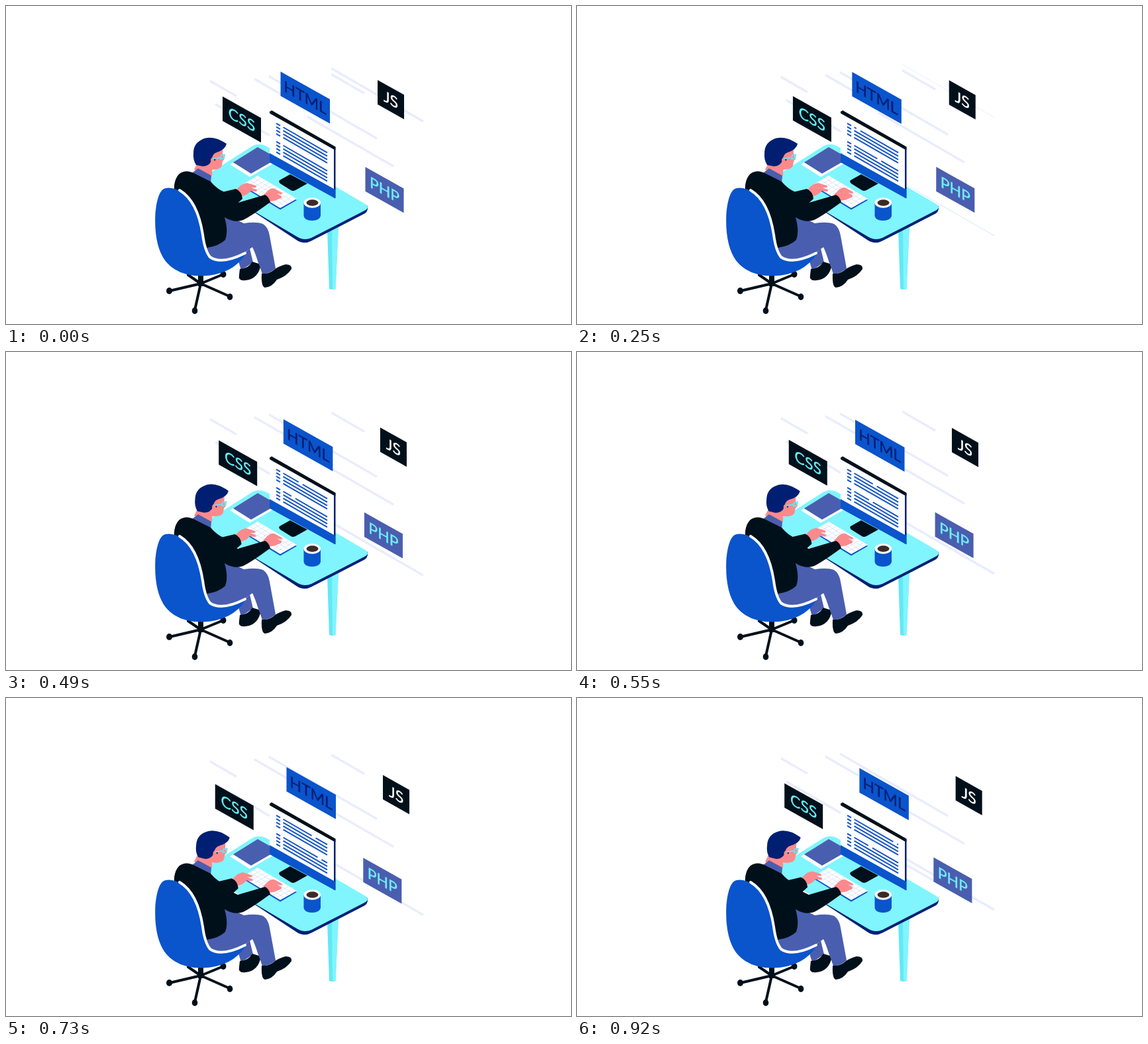
An HTML page that plays this animation: 853x480 px, repeating every 0.98 s.

```html
<!DOCTYPE html>
<html lang="en">
<head>
<meta charset="utf-8">
<title>Developer at a desk</title>
<style>
html, body { margin: 0; width: 100%; height: 100%; overflow: hidden; background: #fff; }
svg { display: block; width: 100vw; height: 100vh; }
text { font: 23px Lato, "Open Sans", sans-serif; text-anchor: middle; stroke-width: .4px; }
.blue { fill: #0a54cc; }
.navy { fill: #001f73; }
.dark { fill: #00101a; }
.slate { fill: #4a5eaf; }
.skin { fill: #fb8a8d; }
.cyan { fill: #80f5fe; }
.white { fill: #fff; }
.line { fill: none; stroke-linecap: round; stroke-linejoin: round; }
</style>
</head>
<body>
<svg viewBox="0 0 853 480">
  <g id="streaks" stroke="#e8ecfd"></g>
  <g id="cards"></g>

  <!-- desk -->
  <path fill="#62e8f5" d="M485 338L502 330L497.500 427Q493 429 488 427Z"/>
  <path class="cyan" d="M492 335L502 330L497.500 427Q495 428 493 428Z"/>
  <path class="navy" d="M300 262L439 353.500Q450 360.500 461 354.500L541 313.500Q547 310 546 302L400 230Z"/>
  <path class="cyan" d="M300 257L371 212Q380 206 392 211L541 298Q551 304 541 309L461 350Q450 355 439 348L300 266Z"/>

  <!-- notebook -->
  <path class="white" d="M338 239L343 236L370 252L410 229V234L368 258Z"/>
  <path class="slate" d="M343 236L380 213L410 230L370 253Z"/>

  <!-- monitor -->
  <path class="dark" d="M413 263L429 254L455 268L437 278Q433 280 430 278L414 268Q411 265 413 263Z"/>
  <path class="dark" d="M398 163V159.500L401 157.500L497.500 212.500V217L494 219Z"/>
  <path class="navy" d="M494 217L497.500 213V290L494 289Z"/>
  <path class="white" d="M398 162L495 216.500V280L398 226Z"/>
  <path class="blue" d="M398 222L495 276L497 277V290.500L398 236Z"/>
  <g id="code" class="line" stroke-width="2"></g>

  <!-- keyboard -->
  <path class="blue" d="M356 272L380 258L439 293L414 307.500Z"/>
  <path class="white" d="M356 270L380 256L439 291L414 305Z"/>
  <g id="keys" stroke="#d2dff5" stroke-width=".8"></g>

  <!-- mug -->
  <path class="blue" d="M449.500 297V317Q451 324 462 324T475 317V297Z"/>
  <ellipse class="white" cx="462.300" cy="297" rx="12.800" ry="7.800"/>
  <ellipse fill="#3b2b28" cx="462.500" cy="297" rx="9" ry="4.700"/>

  <!-- legs -->
  <path class="slate" d="M350 382L368 366L373 387L355 399Z"/>
  <path class="dark" d="M353 397Q365 397 372 386L385 390Q381 412 362 414Q350 416 352 406Z"/>
  <path class="slate" d="M328 319Q342 319 359 328Q378 325 388 329Q396 334 398 347L407 396Q398 404 387 405Q385 398 380 385Q376 372 372 364L340 386L303 380V358Z"/>
  <path class="dark" d="M386 404Q398 405 406 397Q412 393 422 390Q432 390 431 397Q424 408 409 413Q402 424 391 425Q385 424 386 404Z"/>

  <!-- hands -->
  <g id="farHand">
    <path class="skin" d="M346 281L350 275Q356 268 364 267L377 271Q380 273 376 274L370 274L378 277Q381 280 376 280L369 279Q366 284 360 286L352 288Z"/>
    <path class="dark" d="M326 281L347 276Q356 280 357 291L345 302L328 296Z"/>
  </g>
  <g id="nearHand">
    <path class="skin" d="M388 286L396 278Q401 274 406 276L417 282Q418 284 414 284L409 283L416 287Q417 290 412 291Q406 295 397 295Z"/>
  </g>

  <!-- head and torso -->
  <path class="skin" d="M289 237L312 236L311 256Q302 258 284 247Z"/>
  <path class="slate" d="M281 252L290 245L310 256L309 268Q296 264 281 252Z"/>
  <g id="head">
    <path class="skin" d="M296 221L327 215L327 224L330 231L327 234L326 241Q324 247 312 247L301 247L292 239Z"/>
    <path class="navy" d="M283 222Q283 208 295 202Q305 196 320 201Q329 205 333 208Q331 217 318 221Q311 223 310 234Q306 242 297 242L287 240Q282 232 283 222Z"/>
    <ellipse class="skin" cx="312" cy="233" rx="3" ry="4"/>
    <path class="dark" d="M313.500 231.500L316.500 231L315.500 234Z"/>
    <path class="line" stroke="#65e5f2" stroke-width="1.900" d="M313 230.500L324 228.500M325 225.500L330 224.500L329 230L324 231Z"/>
  </g>
  <path class="dark" d="M254 284Q252 262 262 253Q272 246 285 253L309 265Q318 276 330 281L340 292L350 297L391 285Q397 288 399 296Q372 316 358 323Q345 328 330 319Q336 340 331 353Q322 362 303 365L275 330Z"/>

  <!-- chair -->
  <g class="line" stroke="#00101a">
    <path stroke-width="8" stroke-linecap="butt" d="M294 402V423"/>
    <path stroke-width="4" d="M294 419L247 430M294 419L285 459M294 419L337 438M294 419L328 405M294 419L275 406"/>
  </g>
  <g class="dark">
    <ellipse cx="246.500" cy="430" rx="4.500" ry="5"/>
    <ellipse cx="285" cy="460" rx="4.300" ry="5"/>
    <ellipse cx="338" cy="439" rx="4.300" ry="5"/>
    <ellipse cx="328" cy="405" rx="4.500" ry="5"/>
  </g>
  <path class="blue" d="M241 275Q229 277 225.500 312Q223 360 240 384Q258 407.500 296 407.500Q342 406 362 374Q325 392 306 379Q299 368 296 345Q288 295 262 279Q250 273 241 275Z"/>
  <path class="line" stroke="#fff" stroke-width="4" d="M262 278Q289 294 297 345Q300 369 308 379Q325 391 361 373"/>
</svg>

<script>
const LOOP = 980, ISO = 0.577;
const $ = id => document.getElementById(id);

function add(parent, tag, attrs) {
  const el = document.createElementNS("http://www.w3.org/2000/svg", tag);
  for (const k in attrs) el.setAttribute(k, attrs[k]);
  return parent.appendChild(el);
}

const clamp = v => Math.max(0, Math.min(1, v));
const ramp = (t, a, b) => clamp((t - a) / (b - a));
const smooth = (t, a, b) => { const p = ramp(t, a, b); return p * p * (3 - 2 * p); };

// A stroke along the isometric axis, from x1 to x2
const iso = (x1, y1, x2) => `M${x1} ${y1}L${x2} ${y1 + (x2 - x1) * ISO}`;

// Rising streaks: start x, start y, end x, speed in px/ms, visibility over time
const SLOW = 0.0238, FAST = 0.0405;
const always = () => 1;
const streaks = [
  [308, 113, 348, SLOW, always],
  [375, 110, 425, SLOW, always],
  [397, 106, 560, SLOW, always],
  [316, 148, 402, SLOW, always],
  [455, 167, 585, SLOW, always],
  [491, 94, 630, SLOW, t => 1 - ramp(t, 130, 290)],
  [491, 103, 541, SLOW, t => 1 - ramp(t, 730, 880)],
  [491, 276.800, 630, FAST, t => ramp(t, 190, 350)],
  [491, 285.500, 541, FAST, t => ramp(t, 780, 920)]
].map(([x1, y, x2, speed, show]) =>
  ({ speed, show, el: add($("streaks"), "path", { d: iso(x1, y, x2) }) }));

// Floating cards: label, x, y, width, colours, travel, end of easing
const cards = [
  ["CSS", 327, 136.600, 58, "#00101a", "#65f0f8", -14, 980],
  ["HTML", 414.500, 99, 74.500, "#0a54cc", "#001f73", 13, 1100],
  ["JS", 561, 111.700, 40, "#00101a", "#fff", 11.600, 1100],
  ["PHP", 542.500, 243, 58, "#4a5eaf", "#70eefa", -4.600, 1100]
].map(([label, x, y, w, bg, ink, travel, end]) => {
  const el = add($("cards"), "g", {});
  add(el, "rect", { width: w, height: 36.800, fill: bg });
  add(el, "text", { x: w / 2, y: 26.700, fill: ink, stroke: ink }).textContent = label;
  return { el, x, y, travel, end };
});

// Code rows on the screen, in two blocks of four
const rowY = i => 183 + (i % 4) * 5.200 + (i > 3 ? 27.500 : 0);
for (let i = 0; i < 8; i++) {
  add($("code"), "path", {
    stroke: "#1354c4",
    "stroke-linecap": "butt",
    d: iso(408, rowY(i) - 5.800, 414) + iso(418.500, rowY(i), 485)
  });
}
const gaps = [0, 4].map(row => ({
  row,
  el: add($("code"), "path", { stroke: "#fff", "stroke-width": 3.600, "stroke-linecap": "butt" })
}));

// Keyboard grid
for (let i = 1; i < 4; i++)
  add($("keys"), "path", { d: `M${380 - 6 * i} ${256 + 3.500 * i}l58.500 35` });
for (let i = 1; i < 10; i++)
  add($("keys"), "path", { d: `M${380 + 5.900 * i} ${256 + 3.500 * i}l-24.500 14` });

function setGap({ row, el }, x) {
  const a = Math.max(418, x - 3), b = Math.min(486, x + 3);
  el.setAttribute("d", b > a ? iso(a, rowY(row) + (a - 418.500) * ISO, b) : "");
}

// The picture holds on a 60 ms beat, with two longer rests
function beat(t) {
  if (t < 130) return 0;
  if (t < 860) return Math.min(730, 130 + 60 * Math.floor((t - 130) / 60));
  return t < 920 ? 860 : 920;
}

function draw(t) {
  for (const s of streaks) {
    s.el.setAttribute("transform", `translate(0 ${-s.speed * t})`);
    s.el.setAttribute("stroke-width", 3.300 * s.show(t));
  }
  for (const c of cards) {
    const d = c.travel * smooth(t, 100, c.end);
    c.el.setAttribute("transform", `matrix(1 .56 0 1 ${c.x + d} ${c.y + d * ISO})`);
  }
  setGap(gaps[0], 404 + 0.083 * t);
  setGap(gaps[1], 415 + (0.165 * t) % 62);

  const nod = smooth(t, 210, 700);
  $("head").setAttribute("transform", `translate(${2.600 * nod} ${nod}) rotate(${3 * nod} 300 250)`);
  const reach = smooth(t, 330, 960);
  $("farHand").setAttribute("transform", `translate(${-9 * reach} ${-5.500 * reach})`);
  $("nearHand").setAttribute("transform", `translate(0 ${-1.500 * smooth(t, 100, 300)})`);
}

const start = performance.now();
function tick() {
  draw(beat((performance.now() - start) % LOOP));
  requestAnimationFrame(tick);
}
tick();
</script>
</body>
</html>
```
